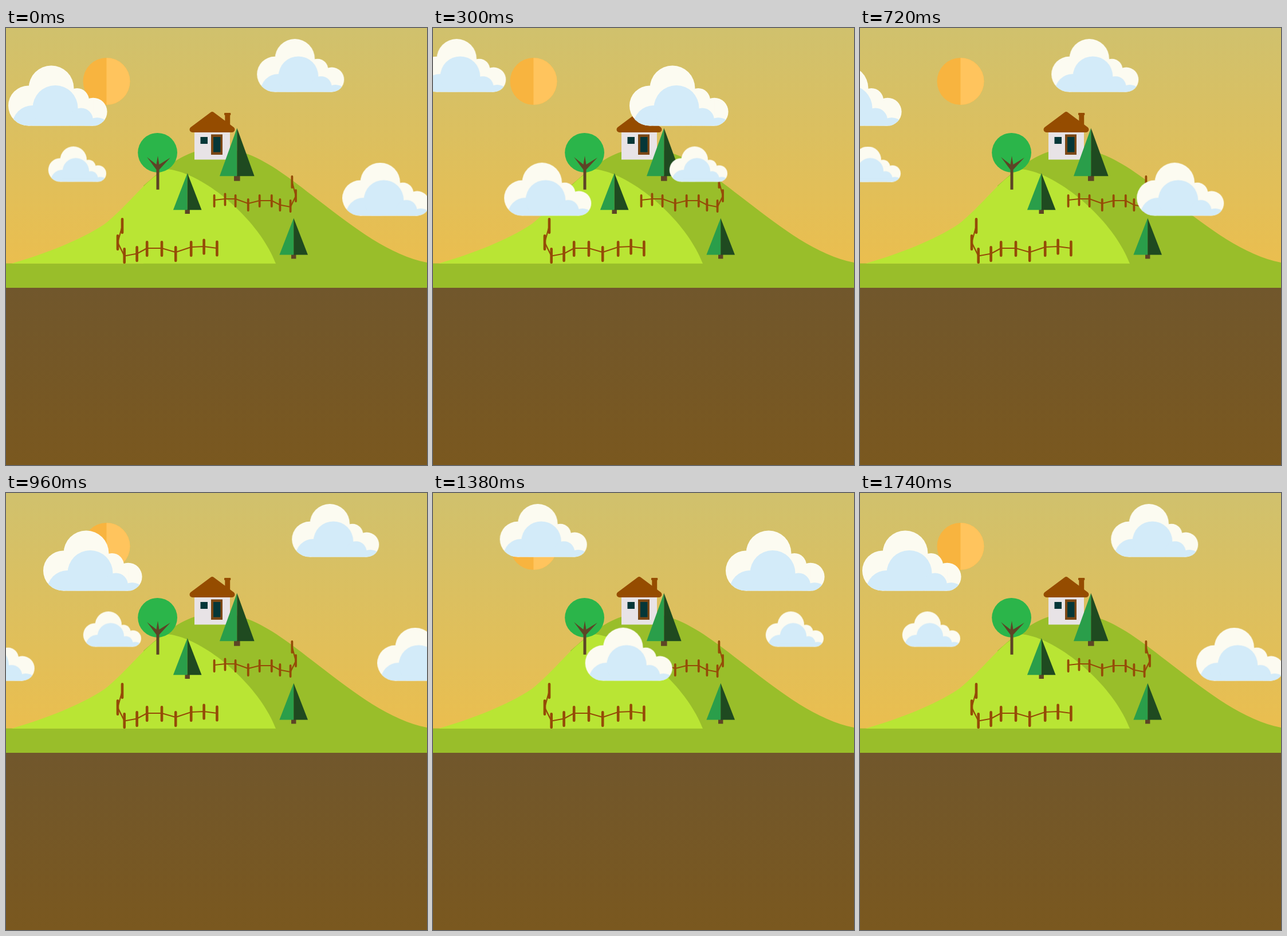
Write an HTML page that moves like this. It is 735 by 762 pixels and loops after 1.8 s.

```html
<!DOCTYPE html>
<html lang="en">
<head>
<meta charset="utf-8">
<title>House on the hill</title>
<style>
  html, body { margin: 0; width: 100%; height: 100%; overflow: hidden; }
  svg { display: block; width: 735px; height: 762px; }
</style>
</head>
<body>
<svg viewBox="0 0 735 762">
  <defs>
    <linearGradient id="sky" gradientUnits="userSpaceOnUse" x1="0" y1="0" x2="0" y2="410">
      <stop stop-color="#d0c16d"/><stop offset="1" stop-color="#eabe4f"/>
    </linearGradient>
    <linearGradient id="soil" x1="0" y1="0" x2="0" y2="1">
      <stop stop-color="#71572c"/><stop offset="1" stop-color="#7a581f"/>
    </linearGradient>
    <g id="puff">
      <circle cx="35" cy="70" r="35"/>
      <circle cx="75" cy="39.5" r="39.5"/>
      <circle cx="120" cy="60.5" r="21"/>
      <circle cx="148.2" cy="80.6" r="24.4"/>
      <rect x="35" y="60" width="113.2" height="45"/>
    </g>
    <clipPath id="puffClip">
      <circle cx="35" cy="70" r="35"/>
      <circle cx="75" cy="39.5" r="39.5"/>
      <circle cx="120" cy="60.5" r="21"/>
      <circle cx="148.2" cy="80.6" r="24.4"/>
      <rect x="35" y="60" width="113.2" height="45"/>
    </clipPath>
    <g id="cloud">
      <use href="#puff" fill="#fcfbf1"/>
      <g clip-path="url(#puffClip)"><use href="#puff" x="7" y="34.5" fill="#d3ebf9"/></g>
    </g>
    <g id="sheet">
      <use href="#cloud" transform="translate(4 65.5)"/>
      <use href="#cloud" transform="translate(438.2 19) scale(.881)"/>
      <use href="#cloud" transform="translate(73.8 206.5) scale(.586)"/>
      <use href="#cloud" transform="translate(587.2 234.7) scale(.881)"/>
    </g>
  </defs>

  <rect width="735" height="412" fill="url(#sky)"/>
  <circle cx="175.5" cy="93" r="41" fill="#f8b43f"/>
  <path d="M175.5 52a41 41 0 0 1 0 82z" fill="#ffc45d"/>

  <path d="M240 275C285 235 320 212 360 210C425 205 480 250 545 300C610 350 670 396 735 409V453H0V410.5H240z" fill="#99be2a"/>
  <path d="M10 410.7C70 393 130 370 172 342C215 308 245 262 280 246C340 250 440 330 471 410.7z" fill="#b9e534"/>
  <rect y="453" width="735" height="309" fill="url(#soil)"/>

  <g fill="#954c00">
    <rect x="329" y="179" width="62" height="50.5" fill="#e8e3e6"/>
    <rect x="382.3" y="150" width="8.9" height="26"/>
    <rect x="381" y="148" width="11.3" height="4" rx="1"/>
    <path d="M325.5 177L360 151.2L394.5 177z" stroke="#954c00" stroke-width="10" stroke-linejoin="round"/>
    <rect x="358" y="185.5" width="20" height="35.5" fill="#7b4715"/>
    <path d="M362 190h12.5v26.5H362zM339.5 190H352v12h-12.5z" fill="#053738"/>
  </g>

  <circle cx="264.6" cy="217.3" r="34.4" fill="#2bb54a"/>
  <path d="M262.5 281.7V247L246 225L262.5 238L265 223L267.5 238L287 226L267.5 247V281.7z" fill="#5d4426"/>

  <g id="pines"></g>
  <g id="fences" fill="none" stroke="#954b07" stroke-linecap="round" stroke-linejoin="round"></g>
  <use href="#sheet" id="ahead"/>
  <use href="#sheet" id="behind"/>
</svg>
<script>
const byId = id => document.getElementById(id);

function pine(x, top, base, half, trunk) {
  const w = trunk * 0.62;
  return `<path d="M${x - w} ${base - 1}h${w * 2}v${trunk + 1}h${-w * 2}z" fill="#5d4426"/>
    <path d="M${x} ${top}L${x - half} ${base}H${x}z" fill="#2a9e4a"/>
    <path d="M${x} ${top}L${x + half} ${base}H${x}z" fill="#1f4a20"/>`;
}
byId('pines').innerHTML =
  pine(403.3, 174.5, 258.2, 30.3, 8.5) +
  pine(316.7, 253, 317.2, 24.8, 6.8) +
  pine(502.2, 331.5, 395.6, 24.8, 6.8);

// Each post: x, top, height of the rail on it.
function fence(posts, tall, width) {
  const bars = posts.map(([x, y]) => `M${x} ${y + width / 2}v${tall - width}`).join('');
  const rail = posts.map(([x, , y]) => `${x} ${y}`).join('L');
  return `<path d="M${rail}" stroke-width="2.2"/><path d="${bars}" stroke-width="${width}"/>`;
}
byId('fences').innerHTML =
  fence([[203, 331, 345], [195, 360, 374], [206.7, 383, 397.5], [228.6, 380, 393.5], [246.2, 371, 384],
    [272, 371, 384], [296.2, 380, 391], [323.2, 371, 382], [345.6, 367.5, 381], [368.4, 370.5, 384]], 28, 4.6) +
  fence([[499.4, 257, 268], [506, 281, 293], [496.6, 299, 312], [478.4, 297, 308.5], [463.8, 290, 301],
    [442.7, 290, 301], [422.8, 297, 306], [400.6, 290, 298], [382.5, 287.5, 298], [363.6, 290, 300]], 23, 3.8);

// Sheet offsets at some of the 27 steps of one pass; two passes make the loop.
const STEPS = 27;
const path = [
  [0, 0, -746], [2, 61, -689.5], [6, 196, -576], [10, 339, -463],
  [15, 507, -321.5], [19, 639, -208], [STEPS, 890, 0]
];
function offset(step, column) {
  const i = path.findIndex(p => p[0] > step);
  const a = path[i - 1], b = path[i];
  return a[column] + (b[column] - a[column]) * (step - a[0]) / (b[0] - a[0]);
}
function drift(id, column) {
  const frames = [];
  for (let n = 0; n <= 30; n++) {
    const step = Math.round(n % 15 * STEPS / 14) % STEPS;
    frames.push({
      transform: `translateX(${offset(step, column)}px)`,
      offset: n / 30,
      easing: 'step-end'
    });
  }
  byId(id).animate(frames, { duration: 1800, iterations: Infinity });
}
drift('ahead', 1);
drift('behind', 2);
</script>
</body>
</html>
```
